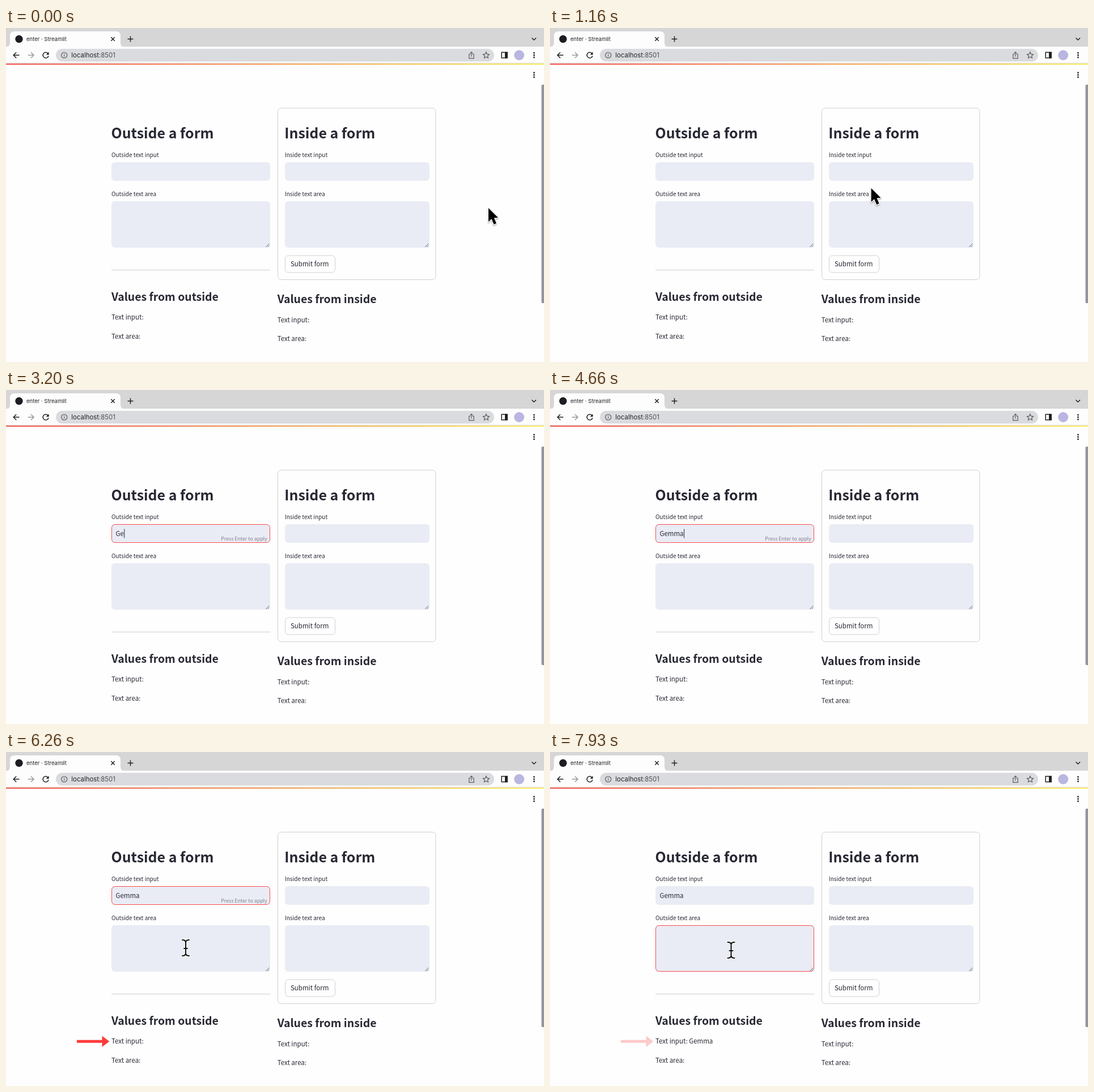
Recreate the animation shown at these times as an HTML page. Size 949 px wide and 590 px high, loop 8000 ms.

```html
<!DOCTYPE html>
<html lang="en">
<head>
<meta charset="utf-8">
<title>Form demo</title>
<style>
html, body { margin: 0; height: 100%; overflow: hidden; background: #fefefe; }
svg { display: block; }
text { font: 11.5px "Noto Sans CJK JP", "Noto Sans CJK SC", "Noto Sans", sans-serif; fill: #272833; }
.h1 { font-size: 24.9px; font-weight: 700; }
.h2 { font-size: 19.4px; font-weight: 700; }
.label { font-size: 10.05px; }
.hint { font-size: 8.8px; fill: #7f818b; text-anchor: end; }
.ui { font-family: Inter, Roboto, sans-serif; fill: #222327; }
.field { fill: #e9ecf5; }
.box { fill: #fefefe; stroke: #d0d1d4; }
.focus { fill: none; stroke: #ff4b4b; }
.icon { fill: none; stroke: #202124; stroke-width: 1.5; }
.thin { stroke: #5a5c60; stroke-width: 1.2; }
.grip { fill: none; stroke: #555; stroke-width: .9; }
</style>
</head>
<body>
<svg width="949" height="590" viewBox="0 0 949 590">
  <defs>
    <linearGradient id="bar"><stop stop-color="#f4605c"/><stop offset="1" stop-color="#f8ee70"/></linearGradient>
    <filter id="shadow" x="-50%" y="-30%" width="200%" height="180%">
      <feDropShadow dx="0" dy="1.5" stdDeviation="1.3" flood-opacity=".4"/>
    </filter>
    <g id="dots" fill="#222327"><circle cy="-4" r="1.4"/><circle r="1.4"/><circle cy="4" r="1.4"/></g>
    <path id="beam" d="M-6,-14Q0,-14 0,-9.5V9.5Q0,14 -6,14M6,-14Q0,-14 0,-9.5M0,9.5Q0,14 6,14M-3,1H3" fill="none" stroke-linecap="round"/>
  </defs>

  <!-- browser window -->
  <rect width="949" height="34" fill="#d6d6d6"/>
  <rect y="33" width="949" height="29" fill="#fdfdfd"/>
  <path d="M0,33.5Q7,33.5 7,26V14Q7,6 15,6H194Q202,6 202,14V26Q202,33.5 209,33.5Z" fill="#fdfdfd"/>
  <circle cx="23" cy="19.5" r="6.7" fill="#1d1e24"/>
  <text class="ui" x="36" y="23" style="font-size:9.5px">enter · Streamlit</text>
  <path class="icon" d="M185.3,16.3l6.4,6.4m0,-6.4l-6.4,6.4M214.5,19.5h10m-5,-5v10M927.5,17.5l3.8,3.8l3.8,-3.8"/>
  <path class="icon" d="M23.5,48H13.2m5,-5l-5,5l5,5"/>
  <path class="icon" style="stroke:#9a9b9e" d="M38.7,48H49m-5,-5l5,5l-5,5"/>
  <path class="icon" d="M74.2,45A5,5 0 1 0 75,49.3"/>
  <path d="M75.6,42.3v5h-5z" fill="#202124"/>
  <rect x="88" y="36.8" width="773" height="22.4" rx="11.2" fill="#dadbde"/>
  <circle class="icon thin" cx="102.7" cy="48" r="5"/>
  <path class="icon thin" d="M102.7,47v3.6M102.7,44.8v1.3"/>
  <text class="ui" x="115.3" y="52" style="font-size:11.4px">localhost<tspan fill="#4d4f54">:8501</tspan></text>
  <path class="icon thin" d="M819,46.4h-2.2v7.2h8.4v-7.2h-2.2M821,50.5v-8m-2.4,2.3l2.4,-2.4l2.4,2.4"/>
  <path class="icon thin" d="M847,42.6l1.6,3.6l3.9,.4l-2.9,2.6l.8,3.9l-3.4,-2l-3.4,2l.8,-3.9l-2.9,-2.6l3.9,-.4z"/>
  <rect class="icon" x="874.2" y="43" width="10" height="9.8"/>
  <rect x="880" y="42.5" width="5" height="10.8" fill="#202124"/>
  <circle cx="905.2" cy="48" r="9" fill="#b9b6e2"/>
  <use href="#dots" x="931.5" y="48"/>
  <rect y="61.7" width="949" height="1" fill="#d5d5d7"/>
  <rect y="62.7" width="949" height="2.3" fill="url(#bar)"/>
  <use href="#dots" x="931.5" y="83"/>
  <rect x="944.5" y="100" width="6" height="386" rx="2" fill="#96959e"/>

  <!-- left column -->
  <text class="h1" x="185.5" y="194.5">Outside a form</text>
  <text class="label" x="186" y="228.3">Outside text input</text>
  <rect class="field" x="186" y="237" width="280" height="33" rx="6"/>
  <text class="label" x="186" y="297">Outside text area</text>
  <rect class="field" x="186" y="306" width="280" height="82" rx="6"/>
  <rect id="inputFocus" class="focus" x="186.5" y="237.5" width="279" height="32" rx="6"/>
  <rect id="areaFocus" class="focus" x="186.5" y="306.5" width="279" height="81" rx="6"/>
  <path class="grip" d="M458.3,387l6,-6M461.6,387l2.7,-2.7"/>
  <text id="typed" x="193.5" y="258"></text>
  <text id="hint" class="hint" x="460.7" y="265.6">Press Enter to apply</text>
  <rect id="caret" width="1" height="16" fill="#272833"/>
  <path d="M186,427.5H466" stroke="#cdced1"/>
  <text class="h2" x="186" y="482">Values from outside</text>
  <text id="result" x="186" y="515"></text>
  <text x="186" y="549">Text area:</text>
  <path id="pointer" d="M125,508.7H169.5V501.5L182.3,511.2L169.5,521V513.7H125Z" fill="#ff2b2b"/>

  <!-- right column -->
  <rect class="box" x="479.5" y="141.5" width="278.5" height="303" rx="6"/>
  <text class="h1" x="491.3" y="194.5">Inside a form</text>
  <text class="label" x="491.7" y="228.3">Inside text input</text>
  <rect class="field" x="492" y="237" width="255" height="33" rx="6"/>
  <text class="label" x="491.7" y="297">Inside text area</text>
  <rect class="field" x="492" y="306" width="255" height="82" rx="6"/>
  <path class="grip" d="M739.3,387l6,-6M742.6,387l2.7,-2.7"/>
  <rect class="box" x="492.5" y="402" width="88" height="30" rx="6"/>
  <text x="502" y="420.5">Submit form</text>
  <text class="h2" x="478.7" y="486">Values from inside</text>
  <text x="478.7" y="519.5">Text input:</text>
  <text x="478.7" y="553">Text area:</text>

  <!-- mouse cursors -->
  <g id="arrow" filter="url(#shadow)">
    <path d="M0,0V24.3L5.4,19.3L9.7,29L14,27.1L9.9,17.6L17,17Z" stroke="#fff" stroke-width="2.2" stroke-linejoin="round" paint-order="stroke"/>
  </g>
  <g id="ibeam">
    <use href="#beam" stroke="#fff" stroke-width="4.2" opacity=".85"/>
    <use href="#beam" stroke="#111" stroke-width="2.1"/>
  </g>
</svg>
<script>
const LOOP = 8000, NAME = 'Gemma';
const KEYS = [2930, 3200, 3330, 3460, 3660]; // one key press per letter
const CLICK = 2150, BLUR = 7160, COMMIT = 7300;
const IN_PATH = [[500, 851, 318], [1160, 567, 283], [1300, 504.5, 276.5], [1760, 332, 256]];
const DOWN_PATH = [[5160, 332, 256], [5400, 322.5, 263], [5960, 322, 335.5], [6260, 317, 346], [6330, 319.5, 350]];

const el = id => document.getElementById(id);
const ramp = (t, start, length) => Math.min(1, Math.max(0, (t - start) / length));
const show = (id, amount) => el(id).setAttribute('opacity', +amount);
const write = (id, text) => { if (el(id).textContent !== text) el(id).textContent = text; };

// Smooth curve through timed points, at rest at both ends
function follow(path, t) {
  const last = path.length - 1;
  if (t <= path[0][0]) return path[0].slice(1);
  if (t >= path[last][0]) return path[last].slice(1);
  const i = path.findIndex(p => p[0] > t) - 1;
  const span = path[i + 1][0] - path[i][0], u = (t - path[i][0]) / span;
  const slope = (k, a) => k === 0 || k === last ? 0
    : (path[k + 1][a] - path[k - 1][a]) / (path[k + 1][0] - path[k - 1][0]);
  return [1, 2].map(a => {
    const p = path[i][a], q = path[i + 1][a];
    return p + (q - p) * u * u * (3 - 2 * u)
      + span * u * (1 - u) * (slope(i, a) * (1 - u) - slope(i + 1, a) * u);
  });
}

function draw(t) {
  const count = KEYS.filter(k => t >= k).length;
  const inArea = t >= BLUR;
  write('typed', NAME.slice(0, count));
  write('result', 'Text input:' + (t >= COMMIT ? ' ' + NAME : ''));
  show('hint', count > 0 && t < COMMIT);
  show('inputFocus', ramp(t, CLICK, 200) - ramp(t, BLUR, 200));
  show('areaFocus', ramp(t, BLUR, 200));
  show('pointer', ramp(t, 5340, 1000) - ramp(t, 7180, 1000));

  const blinkStart = inArea ? BLUR + 40 : count ? KEYS[count - 1] : CLICK;
  show('caret', t >= blinkStart && (t - blinkStart) % 1000 < 500);
  el('caret').setAttribute('x', 194 + (inArea || !count ? 0 : el('typed').getComputedTextLength()));
  el('caret').setAttribute('y', inArea ? 313 : 245.5);

  const [x, y] = follow(t < 3000 ? IN_PATH : DOWN_PATH, t);
  const isArrow = t < 1290;
  for (const id of ['arrow', 'ibeam']) el(id).setAttribute('transform', `translate(${x} ${y})`);
  show('arrow', isArrow);
  show('ibeam', !isArrow && (t < KEYS[0] || t >= 5160));
}

const begin = performance.now();
function tick() {
  draw((performance.now() - begin) % LOOP);
  requestAnimationFrame(tick);
}
tick();
</script>
</body>
</html>
```
